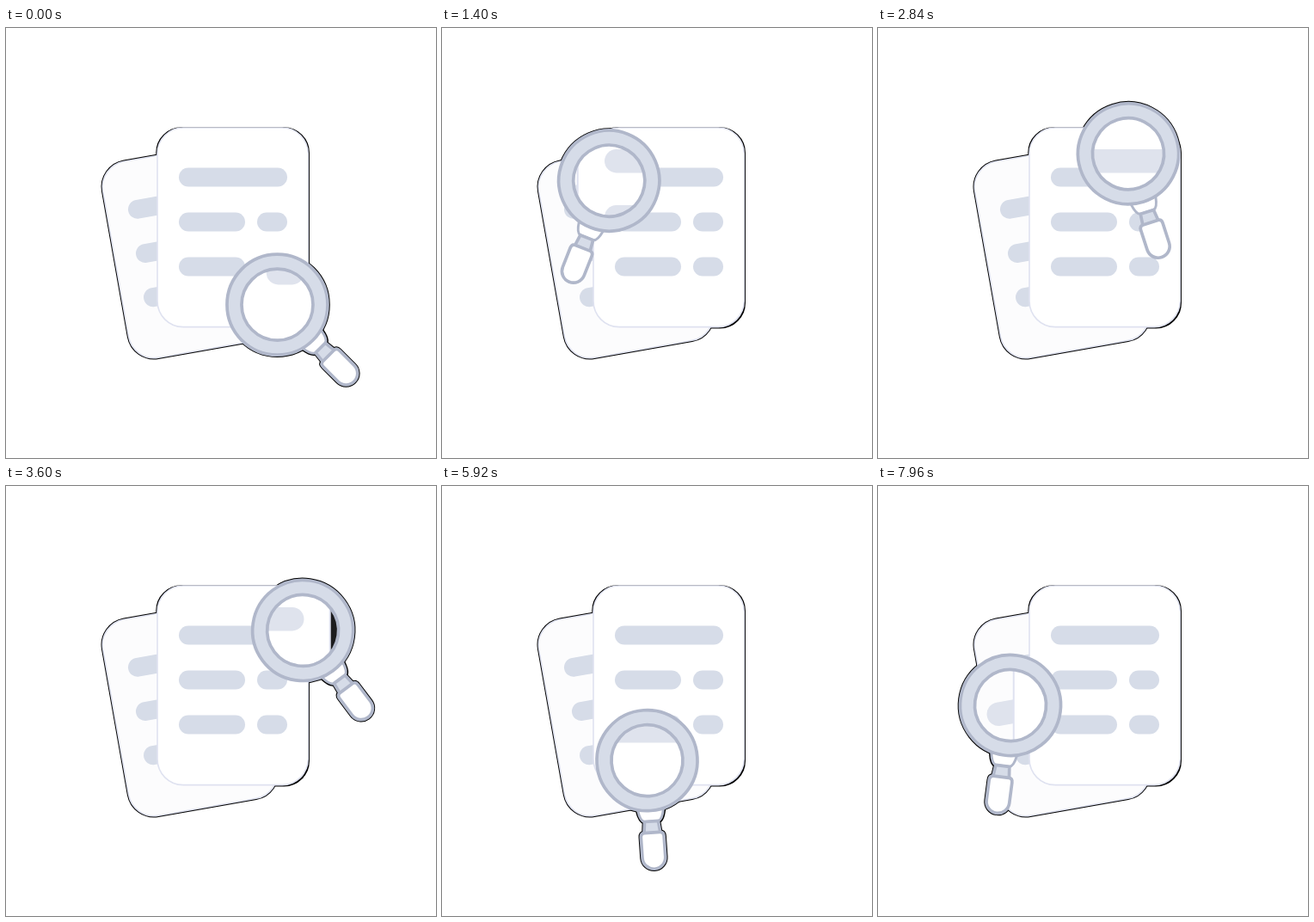
These frames come from a looping animation (500x500 px, 8 s). An HTML page:

```html
<!DOCTYPE html>
<html lang="en">
<head>
<meta charset="utf-8">
<title>Document search</title>
<style>
  html, body { margin: 0; height: 100%; overflow: hidden; background: #fff; }
  svg { display: block; width: 100vw; height: 100vh; }
  #docs { color: #d6dce8; }
  #zoom { color: #dfe3ed; }
  .fringe { fill: #000; stroke: #000; }
</style>
</head>
<body>
<svg viewBox="0 0 500 500">
  <defs>
    <rect id="sheet" x="176" y="116" width="175.2" height="231.6" rx="30"/>
    <g id="page">
      <use href="#sheet"/>
      <g fill="currentColor" stroke="none">
        <rect x="201" y="162.5" width="126" height="22" rx="11"/>
        <rect x="201" y="214.5" width="77" height="22" rx="11"/>
        <rect x="292" y="214.5" width="35" height="22" rx="11"/>
        <rect x="201" y="266.5" width="77" height="22" rx="11"/>
        <rect x="292" y="266.5" width="35" height="22" rx="11"/>
      </g>
    </g>
    <g id="pages" stroke="#dfe2f0" stroke-width="1.6">
      <use href="#page" fill="#fcfcfd" transform="translate(214.6 259.3) rotate(-10) translate(-264.25 -232)"/>
      <use href="#page" fill="#fff"/>
    </g>
    <path id="cap" d="M-15 57Q-13 70 -8 71H8Q13 70 15 57Z"/>
    <path id="neck" d="M-8 71H8L9.5 85H-9.5Z"/>
    <path id="grip" d="M-9 84H9Q13.4 84 13.4 89V113A13.4 13.4 0 0 1 -13.4 113V89Q-13.4 84 -9 84Z"/>
    <clipPath id="glass"><circle id="hole" r="41"/></clipPath>
  </defs>

  <g class="fringe" stroke-width="3.5">
    <use href="#sheet" transform="translate(214.6 259.3) rotate(-10) translate(-264.25 -232)"/>
    <rect x="176" y="117" width="175.2" height="230.8" rx="28"/>
  </g>
  <g class="fringe lens" stroke-width="5.6">
    <circle r="58.5"/>
    <use href="#cap"/><use href="#neck"/><use href="#grip"/>
  </g>

  <g id="docs"><use href="#pages"/></g>

  <g clip-path="url(#glass)">
    <rect width="500" height="500" fill="#1c1c1e"/>
    <g id="zoom" transform="translate(-62.25 -62.25) scale(1.25)"><use href="#pages"/></g>
  </g>

  <g class="lens" stroke="#b0b7ca" stroke-width="3.7" stroke-linejoin="round">
    <use href="#cap" fill="#fff" stroke-width="3"/>
    <use href="#neck" fill="#d6dce8"/>
    <use href="#grip" fill="#fff"/>
    <circle r="50" fill="none" stroke="#d6dce8" stroke-width="17"/>
    <circle r="58.5" fill="none"/>
    <circle r="41.5" fill="none"/>
  </g>
</svg>
<script>
const LOOP = 8000;

// Stops of the lens: centre x, y and handle swing in degrees
const corner = [315.5, 321.7, 45];
const topLeft = [190, 166.2, -30];
const topRight = [344.3, 165, 37];
const lowRight = [325.3, 304.7, 15.5];
const lowLeft = [164, 329.7, -7.4];
const upLeft = [164, 177, -7.4];

// Eased moves; bend is the sideways bulge halfway
const moves = [
  { start: 0, end: 1680, from: corner, to: topLeft, bend: [-10, 0, 6] },
  { start: 1680, end: 3500, from: topLeft, to: topRight, bend: [-8, -21, 1] },
  { start: 3500, end: 4850, from: topRight, to: lowRight, bend: [5, 3, 1] },
  { start: 5350, end: 6560, from: lowRight, to: lowLeft, bend: [-13, 3, -1] },
  { start: 7340, end: 8600, from: lowLeft, to: upLeft, bend: [-10, 0, 0] }
];

function pose(t) {
  const { start, end, from, to, bend } = moves.findLast(m => m.start <= t);
  const u = Math.min(1, (t - start) / (end - start));
  const ease = u * u * (3 - 2 * u), bulge = Math.sin(Math.PI * u);
  return from.map((a, i) => a + (to[i] - a) * ease + bend[i] * bulge);
}

const lenses = document.querySelectorAll('.lens');
const hole = document.getElementById('hole');

function draw() {
  const [x, y, swing] = pose(performance.now() % LOOP);
  const place = `translate(${x} ${y})`;
  hole.setAttribute('transform', place);
  for (const el of lenses) el.setAttribute('transform', `${place} rotate(${-swing})`);
  requestAnimationFrame(draw);
}
draw();
</script>
</body>
</html>
```
